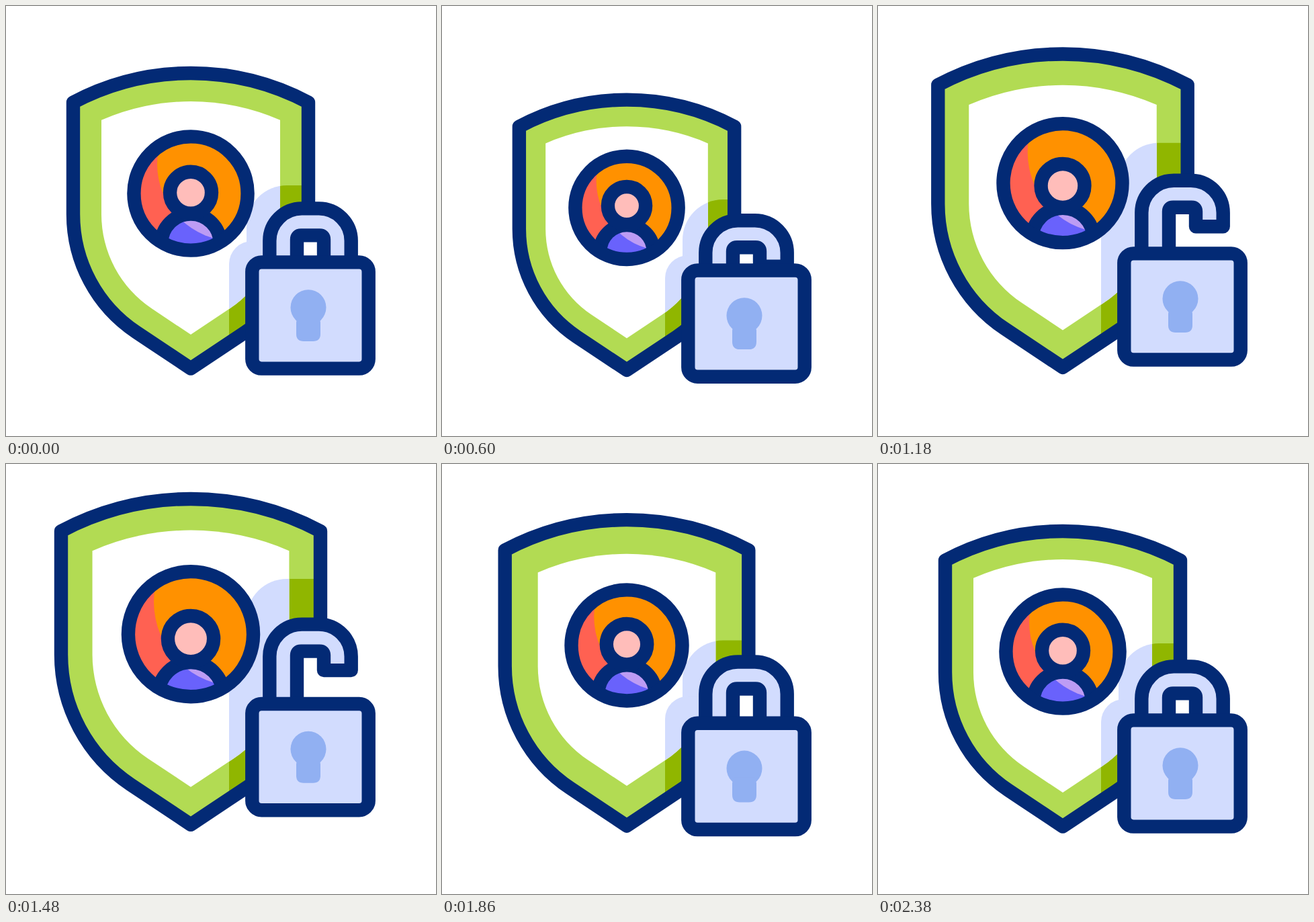
Write an HTML page that moves like this. It is 640 by 640 pixels and loops after 2560 ms.

```html
<!DOCTYPE html>
<html lang="en">
<head>
<meta charset="utf-8">
<title>Protected profile</title>
<style>
  html, body { margin: 0; width: 100%; height: 100%; overflow: hidden; background: #fff; }
  svg { display: block; width: 100%; height: 100%; }
  .line { stroke: #032a75; stroke-width: 20.4; stroke-linejoin: round; }
</style>
</head>
<body>
<svg viewBox="0 0 640 640">
  <defs>
    <clipPath id="shieldClip"><path id="shieldArea"/></clipPath>
    <clipPath id="panelClip"><path id="panelArea"/></clipPath>
    <clipPath id="discClip"><circle id="discArea" cx="275"/></clipPath>
    <clipPath id="bustClip"><circle id="bustArea" cx="275"/></clipPath>
    <g id="shade">
      <rect x="358" y="267" width="190" height="400" rx="60"/>
      <rect x="332" y="350" width="220" height="400" rx="34"/>
    </g>
  </defs>

  <path id="shield" fill="#b2db53"/>
  <g clip-path="url(#shieldClip)"><use class="shade" href="#shade" fill="#90b600"/></g>
  <path id="panel" fill="#fff"/>
  <g clip-path="url(#panelClip)"><use class="shade" href="#shade" fill="#d2dcfe"/></g>
  <path id="shieldLine" class="line" fill="none"/>

  <g clip-path="url(#discClip)">
    <circle id="disc" cx="275" fill="#ff6152"/>
    <circle class="glow" fill="#ff9100"/>
    <circle id="bust" cx="275" fill="#6962fc"/>
    <g clip-path="url(#bustClip)"><circle class="glow" fill="#bd9cf4"/></g>
    <circle id="bustLine" class="line" cx="275" fill="none"/>
    <circle id="head" class="line" cx="275" fill="#ffbdba"/>
  </g>
  <circle id="ring" class="line" cx="275" fill="none"/>

  <path id="gap" fill="#fff"/>
  <path id="shackle" class="line" fill="#d2dcfe"/>
  <g id="lock">
    <rect class="line" x="366.3" y="381.4" width="173.4" height="158.2" rx="14" fill="#d2dcfe"/>
    <g fill="#91b0f2">
      <circle cx="450" cy="448.7" r="26.5"/>
      <path d="M434 462 Q432.5 466 432 471 V488 Q432 499 443 499 H457 Q468 499 468 488 V471 Q467.5 466 466 462 Z"/>
    </g>
  </g>
</svg>
<script>
  const LOOP = 2560, CX = 275;
  const $ = id => document.getElementById(id);
  const shades = document.querySelectorAll('.shade');
  const glows = document.querySelectorAll('.glow');

  function set(el, attrs) {
    for (const name in attrs) el.setAttribute(name, attrs[name]);
  }

  // Eased run: rest, dip, rise, dip, rebound, rest; parts follow with a lag.
  function track(t, lag, rest, dip, rise, rebound) {
    const times = [200, 400, 1500, 1700, 1900].map(k => k + lag);
    times.push(Math.min(2320 + lag, 2372));
    const values = [rest, dip, rise, dip, rebound, rest];
    if (t <= times[0] || t >= times[5]) return rest;
    let i = 0;
    while (t > times[i + 1]) i++;
    const u = (t - times[i]) / (times[i + 1] - times[i]);
    return values[i] + (values[i + 1] - values[i]) * u * u * (3 - 2 * u);
  }

  const size = (t, lag) => track(t, lag, 1, 0.897, 1.103, 1.0514);

  // Shield outline inset by d, scaled by s around height oy, then moved by dy.
  function shieldPath(d, s, oy, dy) {
    const half = 175 - d, top = 374 - d, side = 211 - d;
    const shoulder = 474 - Math.sqrt(top * top - half * half);
    const bx = 36 + side * 0.5547, by = 310 + side * 0.832;
    const tip = 539.5 - d / 0.832;
    const p = (x, y) => (CX + x * s).toFixed(2) + ' ' + (oy + (y - oy) * s + dy).toFixed(2);
    const arc = r => `A${r * s} ${r * s} 0 0 `;
    return `M${p(-half, shoulder)}${arc(top)}1 ${p(half, shoulder)}L${p(half, 310)}` +
      `${arc(side)}1 ${p(bx - 72 + 0, by)}`.replace(p(bx - 72, by), p(side * 0.5547 - 36, by)) +
      `L${p(0, tip)}L${p(36 - side * 0.5547, by)}${arc(side)}1 ${p(-half, 310)}Z`;
  }

  const arch = (y, base) =>
    `M392.3 ${base}V${y + 48}a48 48 0 0 1 48 -48H465.7a48 48 0 0 1 48 48`;

  function shacklePath(y, base, end) {
    return `${arch(y, base)}V${end}H473V${y + 46}q0 -6 -6 -6H439q-6 0 -6 6V${base}Z`;
  }

  function draw(t) {
    const s = size(t, 0), panelSize = size(t, 43), discSize = size(t, 60);
    const shift = 251.5 * (1 - s);

    const outline = shieldPath(0, s, 567, 0);
    for (const id of ['shield', 'shieldArea', 'shieldLine']) set($(id), { d: outline });
    const inner = shieldPath(42, panelSize, 315.5, shift);
    for (const id of ['panel', 'panelArea']) set($(id), { d: inner });

    const cy = 279 + shift, r = 84.6 * discSize;
    for (const id of ['disc', 'discArea', 'ring']) set($(id), { cy, r });
    for (const g of glows) {
      set(g, { cx: CX + 65 * discSize, cy: cy - 44 * discSize, r: 115 * discSize });
    }
    const headY = cy - 1.2 + track(t, 100, 0, -2.25, 8.5, 5.5);
    const bust = { cy: headY + 75.5 * discSize, r: 43.7 * discSize };
    for (const id of ['bust', 'bustArea', 'bustLine']) set($(id), bust);
    set($('head'), { cy: headY, r: 31 * discSize });

    const lockY = track(t, 100, 0, 13, -25.6, -25.6);
    const lift = track(t, 0, 0, 10, -38.5, -13.7);
    const cast = lockY + track(t, 50, 0, 13.4, -72.7, -24.8);
    for (const c of shades) set(c, { transform: `translate(0 ${cast})` });
    set($('lock'), { transform: `translate(0 ${lockY})` });

    const y = 301.4 + lockY + lift, base = 385 + lockY;
    const open = t > 400 && t < 1690;
    set($('gap'), { d: `${arch(y, base)}V${base}Z` });
    set($('shackle'), { d: shacklePath(y, base, open ? Math.min(y + 68.5, base + 6) : base) });
  }

  const start = performance.now();
  function tick() {
    draw((performance.now() - start) % LOOP);
    requestAnimationFrame(tick);
  }
  draw(0);
  requestAnimationFrame(tick);
</script>
</body>
</html>
```
